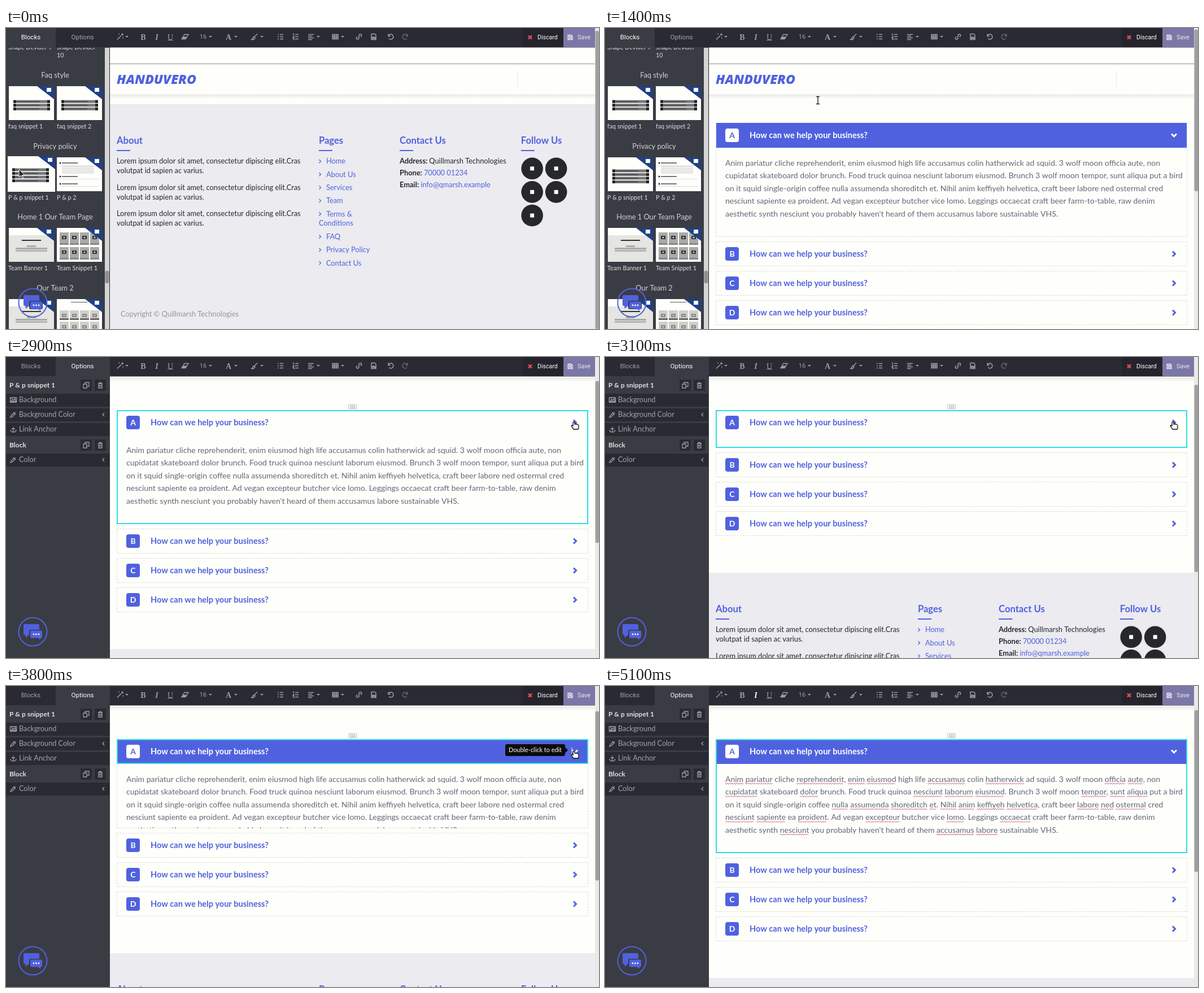
An HTML page with a canvas that plays this animation: 1050x533 px, repeating every 5.2 s.

```html
<!DOCTYPE html>
<html lang="en">
<head>
<meta charset="utf-8">
<title>Website builder: accordion snippet</title>
<style>
html, body { margin: 0; width: 100%; height: 100%; overflow: hidden; }
canvas { display: block; }
</style>
</head>
<body>
<canvas width="1050" height="533"></canvas>
<script>
const g = document.querySelector('canvas').getContext('2d');
const BLUE = '#5061df', WHITE = '#fefffb', DARK = '#2a2a33', PANEL = '#3a3c44', GREY = '#9d9da4', INK = '#26282e';
const OPEN_HEIGHT = 158;

const PARAGRAPH = [
  '~Anim ~pariatur cliche ~reprehenderit, ~enim ~eiusmod high life ~accusamus colin ~hatherwick ad squid. 3 wolf moon ~officia ~aute, non',
  '~cupidatat skateboard ~dolor brunch. Food truck quinoa ~nesciunt ~laborum ~eiusmod. Brunch 3 wolf moon ~tempor, ~sunt ~aliqua put a bird',
  'on it squid single-origin coffee ~nulla ~assumenda ~shoreditch ~et. ~Nihil ~anim ~keffiyeh ~helvetica, craft beer ~labore ~ned ~ostermal cred',
  '~nesciunt ~sapiente ea ~proident. Ad vegan ~excepteur butcher vice ~lomo. Leggings ~occaecat craft beer farm-to-table, raw denim',
  'aesthetic synth ~nesciunt you probably haven\'t heard of them ~accusamus ~labore sustainable VHS.'
];

const ICONS = {
  wand: 'M-5 5L2-2M4-6v4M2-4h4M-2-6v2M5 1v2',
  brush: 'M5-5L0 0M-1 0l2 2q-2 4-6 3q2-1 2-3z',
  list: 'M-5-4h2M-5 0h2M-5 4h2M-1-4h6M-1 0h6M-1 4h6',
  numbers: 'M-4-6v4M-5 0h2l-2 2h2M-5 4h2v2M-1-4h6M-1 0h6M-1 4h6',
  align: 'M-5-4h10M-5-1h7M-5 2h10M-5 5h7',
  table: 'M-5-4h10v8h-10zM-5-1h10M-5 1.5h10M-1.7-4v8M1.7-4v8',
  link: 'M-3 0l-1 1a2 2 0 0 0 3 3l2-2M3 0l1-1a2 2 0 0 0-3-3l-2 2M-1.5 1.5l3-3',
  file: 'M-4-5h6l2 2v8h-8zM-3 3l2-3 2 2 1-1 1 2z',
  undo: 'M-4-5v4h4M-4-1a4.5 4.5 0 1 1 1 4',
  redo: 'M4-5v4h-4M4-1a4.5 4.5 0 1 0-1 4',
  disk: 'M-4-4h6l2 2v6h-8zM-2-4v3h4v-3M-2 4v-3h4v3',
  picture: 'M-5.5-4h11v8h-11zM-4 3l3-4 2 2 2-3 2 5zM-3-2h1',
  dropper: 'M-5 5l1-3 5-5 2 2-5 5zM0-4l4 4M2-2l2-2',
  anchor: 'M0-3v8M-3-1h6M-5 1q0 4 5 4q5 0 5-4M0-5v1',
  copy: 'M-5-2h6v7h-6zM-2-2v-3h7v7h-4',
  trash: 'M-4-3h8M-1.5-3v-1.5h3v1.5M-3-3v8h6v-8M-1-1v4M1-1v4',
  chevron: 'M-2.5-4.5l4.5 4.5-4.5 4.5',
  chevronDown: 'M-4.5-2.5l4.5 4.5 4.5-4.5',
  cross: 'M-3-3l6 6M3-3l-6 6'
};

const rect = (x, y, w, h, color) => { g.fillStyle = color; g.fillRect(x, y, w, h); };
const disc = (x, y, r, color) => { g.fillStyle = color; g.beginPath(); g.arc(x, y, r, 0, 7); g.fill(); };
const round = (x, y, w, h, r, color) => { g.fillStyle = color; g.beginPath(); g.roundRect(x, y, w, h, r); g.fill(); };
const frame = (x, y, w, h, color, width = 1, dash = []) => {
  g.strokeStyle = color; g.lineWidth = width; g.setLineDash(dash);
  g.strokeRect(x, y, w, h); g.setLineDash([]);
};
// y is the visual middle of the line
function text(s, x, y, size, color, style = '', align = 'left', family = 'Lato') {
  g.font = `${style} ${size}px ${family}, sans-serif`;
  g.fillStyle = color; g.textAlign = align;
  g.fillText(s, x, y + size * .35);
  return g.measureText(s).width;
}
function path(d, x, y, fill, stroke, width = 1.3) {
  const p = new Path2D(d);
  g.save(); g.translate(x, y);
  if (fill) { g.fillStyle = fill; g.fill(p); }
  if (stroke) { g.strokeStyle = stroke; g.lineWidth = width; g.stroke(p); }
  g.restore();
}
const icon = (name, x, y, color = GREY, width) => path(ICONS[name], x, y, null, color, width);
function clipped(x, y, w, h, draw) {
  g.save(); g.beginPath(); g.rect(x, y, w, h); g.clip(); draw(); g.restore();
}

const clamp = p => Math.max(0, Math.min(1, p));
const easeOut = p => 1 - (1 - clamp(p)) ** 2.3;
const smooth = p => { p = clamp(p); return p * p * (3 - 2 * p); };
function along(points, t) {
  let [, x, y] = points[0];
  for (let i = 1; i < points.length; i++) {
    const p = smooth((t - points[i - 1][0]) / (points[i][0] - points[i - 1][0]));
    x += (points[i][1] - points[i - 1][1]) * p;
    y += (points[i][2] - points[i - 1][2]) * p;
  }
  return [x, y];
}
const POINTER = [[400, 23, 250], [900, 377, 128], [1600, 377, 128], [1800, 389, 158], [2100, 1036, 152], [2600, 1007, 121]];

function thumb(x, y, kind, w = 80, h = 60) {
  rect(x, y, w, h, WHITE);
  if (kind === 'faq' || kind === 'policy') {
    const n = kind === 'faq' ? 3 : 4;
    for (let i = 0; i < n; i++) {
      const top = y + 34.5 - n * 3.25 + i * 6.5;
      rect(x + 8, top, 65, 5, '#77787a');
      rect(x + 8, top, 5, 5, '#222');
      rect(x + 68, top, 5, 5, '#222');
      rect(x + 14, top + 2, 40, 1, '#333');
    }
  } else if (kind === 'lines') {
    [10, 34, 47].forEach(dy => {
      disc(x + 6, y + dy, 1.5, '#222');
      rect(x + 9, y + dy - 1, 28, 2, '#777');
      rect(x + 4, y + dy + 4, 70, 1, '#ddd');
    });
    for (let i = 0; i < 5; i++) rect(x + 9, y + 16 + i * 2.8, 57, 1, '#c4c4c4');
  } else if (kind === 'banner') {
    rect(x, y + 13, w, 47, '#e5e6e1');
    rect(x + 23, y + 21, 34, 2, '#333');
    rect(x + 32, y + 31, 16, 3, '#aaa');
    rect(x + 12, y + 35, 56, 3, '#aaa');
    rect(x + 12, y + 39, 56, 3, '#b4b4b4');
  } else {
    const pale = kind === 'cards';
    if (pale) rect(x + 25, y + 5, 29, 1, '#555');
    for (let i = 0; i < 8; i++) {
      const cx = x + 5 + i % 4 * 18, cy = y + (pale ? 20 : 8) + (i >> 2) * (pale ? 20 : 26);
      rect(cx, cy, 16, pale ? 17 : 22, pale ? '#cfcfcc' : '#a9aaa8');
      round(cx + 4, cy + 6, 8, 6, 1, pale ? '#888' : '#333');
      disc(cx + 8, cy + 9, 1.6, '#ccc');
      rect(cx, cy + (pale ? 14 : 19), 16, 3, pale ? '#666' : '#888');
    }
  }
  path('M-30 0H0V23z', x + w, y, '#1f4085');
  rect(x + w - 13, y + 3, 8, 7, WHITE);
}

function blocksPanel(hover) {
  clipped(0, 35, 184, 498, () => {
    const label = (s, x, y) => text(s, x, y, 10.7, '#dcdce0');
    label('Shape Devider 9', 4, 34);
    label('Shape Devider', 90, 34);
    label('10', 90, 48);
    [['Faq style', 'faq', 'faq snippet 1', 'faq', 'faq snippet 2'],
     ['Privacy policy', 'policy', 'P & p snippet 1', 'lines', 'P & p 2'],
     ['Home 1 Our Team Page', 'banner', 'Team Banner 1', 'grid', 'Team Snippet 1'],
     ['Our Team 2', 'banner', '', 'cards', '']].forEach(([title, a, aLabel, b, bLabel], i) => {
      const y = Math.round(103 + i * 125.7);
      text(title, 87, y - 19, 12.8, '#d2d2d6', '', 'center');
      if (hover && i === 1) thumb(3, y - 2, a, 84, 63);
      else thumb(5, y, a);
      thumb(90, y, b);
      label(aLabel, 4, y + 71);
      label(bLabel, 90, y + 71);
    });
    rect(175, 35, 8, 498, '#d4d4d4');
    round(175.5, 430, 7, 22, 3, '#8f8f8f');
    rect(183, 35, 1, 498, '#222');
  });
}

function optionsPanel() {
  const head = (s, y) => {
    text(s, 6, y, 12, '#e0e0e3', 'bold');
    rect(132, y - 10, 20, 20, DARK); icon('copy', 142, y);
    rect(157, y - 10, 20, 20, DARK); icon('trash', 167, y);
  };
  const row = (name, s, y, more) => {
    rect(0, y - 11, 183, 23, DARK);
    icon(name, 13, y, '#a3a3a9');
    text(s, 23, y, 12.7, '#a3a3a9');
    if (more) path('M2-3l-3 3 3 3', 172, y, null, '#a3a3a9');
  };
  head('P & p snippet 1', 50);
  row('picture', 'Background', 76);
  row('dropper', 'Background Color', 102, true);
  row('anchor', 'Link Anchor', 128);
  head('Block', 156);
  row('dropper', 'Color', 182, true);
}

function sidebar(t) {
  const options = t >= 2900;
  rect(0, 0, 184, 533, PANEL);
  rect(options ? 0 : 88, 0, options ? 88 : 96, 34, DARK);
  text('Blocks', 44, 16, 11.6, options ? GREY : '#fff', '', 'center', 'Roboto');
  text('Options', 135.5, 16, 11.6, options ? '#fff' : '#a8a8ae', '', 'center', 'Roboto');
  if (options) optionsPanel();
  else blocksPanel(t < 400);
  g.strokeStyle = BLUE; g.lineWidth = 2;
  g.beginPath(); g.arc(47.5, 486.5, 25, 0, 7); g.stroke();
  round(31, 473, 28, 19, 2, BLUE);
  path('M0 0h8l-7 6z', 34, 491, BLUE);
  round(41, 483, 24, 15, 3, PANEL);
  round(43, 484.5, 21, 13, 2, BLUE);
  path('M0 0h6v4z', 55, 496.5, BLUE);
  [49, 53.5, 58].forEach(x => disc(x, 491, 1.4, '#fff'));
}

function toolbar(W, italic) {
  rect(184, 0, W - 184, 34.5, DARK);
  const letter = (s, x, style, color = GREY) => text(s, x, 16, 14, color, style, 'center', 'Liberation Serif');
  letter('B', 243, 'bold');
  letter('I', 267, 'italic bold', italic ? '#fff' : GREY);
  letter('U', 291, '');
  rect(286, 21, 10, 1, GREY);
  letter('A', 394, 'bold');
  text('16', 349, 15.5, 11, GREY, '', 'center', 'Roboto');
  path('M-6 4L-1-4H6L1 4z', 317, 15.5, null, GREY);
  path('M-6 4L-3.5 0H3.5L1 4z', 317, 15.5, GREY);
  [['wand', 202], ['brush', 440], ['list', 486], ['numbers', 513], ['align', 540], ['table', 583],
   ['link', 625], ['file', 651], ['undo', 681]].forEach(([name, x]) => icon(name, x, 15.5, GREY, 1.5));
  icon('redo', 707, 15.5, '#66666e', 1.5);
  [214, 362, 407, 453, 553, 596].forEach(x => path('M-3-1.5h6l-3 3z', x, 15.5, GREY));
  rect(W - 128, 0, 72, 34, '#25242c');
  icon('cross', W - 115, 16.5, '#d64c5c', 2.6);
  text('Discard', W - 102, 16.5, 10.6, '#fff', '', 'left', 'Roboto');
  rect(W - 56, 0, 56, 34, '#7b77a7');
  icon('disk', W - 44, 16.5, '#e8e8f2');
  text('Save', W - 31, 16.5, 10.8, '#e8e8f2', '', 'left', 'Roboto');
}

function header(W, dy) {
  const bottom = 123 - dy;
  rect(184, Math.round(68.4 - dy), W - 184, 1, '#8b8b8b');
  text('HANDUVERO', 196, 96 - dy, 23, BLUE, 'italic 800', 'left', 'Open Sans');
  rect(W - 138, 81 - dy, 1, 30, '#e6e6e4');
  const shade = g.createLinearGradient(0, bottom, 0, bottom + 8);
  shade.addColorStop(0, '#e9eae8');
  shade.addColorStop(1, WHITE);
  rect(184, bottom, W - 184, 8, shade);
}

function footer(W, top) {
  rect(184, top, W - 184, 533, '#ebebf0');
  const column = n => 196 + (W - 184) * n / 12;
  const [about, pages, contact, follow] = [0, 5, 7, 10].map(column);
  const put = (s, x, dy, color = INK, style) => text(s, x, top + dy, 12.8, color, style);
  [['About', about], ['Pages', pages], ['Contact Us', contact], ['Follow Us', follow]].forEach(([s, x]) => {
    text(s, x, top + 64, 16.6, BLUE, 'bold');
    rect(x, top + 81, 24, 2, BLUE);
  });
  [101, 147.5, 194].forEach(dy => {
    put('Lorem ipsum dolor sit amet, consectetur dipiscing elit.Cras', about, dy);
    put('volutpat id sapien ac varius.', about, dy + 17);
  });
  ['Home', 'About Us', 'Services', 'Team', 'Terms &', 'FAQ', 'Privacy Policy', 'Contact Us'].forEach((s, i) => {
    const dy = 101 + i * 23.3 + (i > 4 ? 17 : 0);
    path('M-1.5-3l3 3-3 3', pages + 2, top + dy, null, BLUE);
    put(s, pages + 13, dy, BLUE);
  });
  put('Conditions', pages, 211, BLUE);
  [['Address:', 'Quillmarsh Technologies', INK], ['Phone:', '70000 01234', BLUE], ['Email:', 'info@qmarsh.example', BLUE]]
    .forEach(([label, value, color], i) => {
      const w = put(label, contact, 101 + i * 21, INK, 'bold');
      put(value, contact + w + 3, 101 + i * 21, color);
    });
  for (let i = 0; i < 5; i++) {
    const x = follow + 19.8 + i % 2 * 42.5, y = top + 113.8 + (i >> 1) * 41.6;
    disc(x, y, 19.3, '#26282a');
    rect(x - 3.5, y - 3.5, 7, 7, '#fff');
  }
  put('Copyright © Quillmarsh Technologies', 203, 371.5, '#96979c');
}

function squiggle(x, y, w) {
  g.strokeStyle = '#d0507a'; g.lineWidth = 1;
  g.beginPath(); g.moveTo(x, y);
  for (let i = 2; i <= w; i += 2) g.lineTo(x + i, y + i / 2 % 2 * 2);
  g.stroke();
}

function paragraph(top, checkedLines) {
  PARAGRAPH.forEach((line, i) => {
    const y = top + i * 22.5;
    text(line.replaceAll('~', ''), 213, y, 14, '#626776');
    if (i >= checkedLines) return;
    let x = 213;
    for (const word of line.split(' ')) {
      const plain = word.replace('~', '');
      if (plain !== word) squiggle(x, y + 7, g.measureText(plain.replace(/[.,]$/, '')).width);
      x += g.measureText(plain + ' ').width;
    }
  });
}

function accordion(top, extra, active, checkedLines) {
  [...'ABCD'].forEach((letter, i) => {
    const y = top + i * 52 + (i ? extra : 0), on = active && !i;
    frame(196.5, y + .5, 834, 43 + (i ? 0 : extra), '#d8dad8', 1, [3, 2]);
    if (on) rect(197, y, 833, 44, BLUE);
    round(213, y + 10, 24, 24, 4, on ? WHITE : BLUE);
    text(letter, 225, y + 22, 14, on ? BLUE : WHITE, 'bold', 'center');
    text('How can we help your business?', 256, y + 22, 14.5, on ? WHITE : BLUE, 'bold');
    icon(on ? 'chevronDown' : 'chevron', 1007.5, y + 22, on ? WHITE : BLUE, 3);
  });
  clipped(197, top + 44, 833, extra, () => paragraph(top + 71, checkedLines));
}

function pointer(t) {
  const [x, y] = along(POINTER, t);
  if (t < 500 || (t >= 2100 && t < 2400)) {
    path('M0 0V14L3.5 11 6 16.5 8 15.5 5.5 10.5H10z', x, y, '#222', '#fff', 1);
  } else if (t < 1300) {
    path('M-5-1q-1-3 2-3q2-2 4-1q3-1 4 1q2 0 1 4l-1 4h-8z', x, y, '#fff', '#111', 1.4);
  } else if (t < 2100) {
    path('M-3-6.5h2.5l.5 1 .5-1H3M0-6v12M-3 6.5h2.5l.5-1 .5 1H3', x, y, null, '#222', 1.4);
  } else if (t < 4200) {
    path('M-3 1v-6q1.5-2 3 0v3q5-1 7 2v4l-1 3h-8l-4-6q1-2 3 0z', x, y, '#fff', '#111', 1.3);
  }
}

function tooltip() {
  round(884, 103, 106, 21, 3, '#0c0c0e');
  path('M0-5l5 5-5 5z', 990, 113.5, '#0c0c0e');
  text('Double-click to edit', 937, 113, 10.9, '#fff', '', 'center');
}

function draw(t) {
  const dragging = t >= 500 && t < 1300, placed = t >= 1300, selected = t >= 2900;
  const W = dragging ? 1050 : 1043;
  const scroll = dragging ? 0 : 5 + 73 * smooth((t - 1500) / 300) + selected;
  const openness = t < 3650 ? 1 - easeOut((t - 2900) / 350) : easeOut((t - 3650) / 350);
  const extra = Math.round(OPEN_HEIGHT * openness), top = Math.round(173 - scroll);

  rect(0, 0, 1050, 533, WHITE);
  clipped(184, 34, W - 184, 499, () => {
    header(W, scroll * 1.1);
    footer(W, placed ? top + 265 + extra : 135);
    if (placed) accordion(top, extra, !selected || t >= 3700, Math.floor((t - 4200) / 100));
    if (dragging) {
      rect(184, 111, W - 184, 24, 'rgba(85,85,125,.17)');
      rect(184, 123, W - 184, 5, 'rgba(60,60,80,.04)');
      frame(184.5, 111.5, W - 185, 23, '#b3b3ba', 1, [5, 3]);
    }
    if (selected) {
      frame(197, top + 1, 833, (t >= 3700 && t < 4200 ? 44 : 44 + extra) - 2, '#2fdde6', 2);
      round(606, 83.5, 15, 9, 2, '#c3c4c6');
      round(607, 84.5, 13, 7, 1, '#f4f5f3');
      for (let i = 0; i < 6; i++) rect(610 + i % 3 * 3, 86 + (i > 2 ? 3 : 0), 1.5, 1.5, '#888');
    }
  });
  sidebar(t);
  toolbar(W, t >= 4300);
  if (!dragging) {
    const total = placed ? 833 + extra : 538;
    rect(1043, 0, 7, 533, '#e9e9e7');
    round(1043.5, scroll * 533 / total, 6.5, 533 * 533 / total, 3, '#a0a0a0');
  }
  if (dragging) {
    const [x, y] = along(POINTER, t);
    rect(x - 4, y - 2, 80, 84, PANEL);
    thumb(x - 4, y - 2, 'policy', 80, 62);
    rect(x - 4, y - 2, 1, 22, '#444');
    text('P & p snippet 1', x, y + 71, 10.7, '#dcdce0');
  }
  if ((t >= 3700 && t < 4300) || (t >= 4500 && t < 5100)) rect(1001.5, 109, 1, 13, '#fff');
  if (t >= 3500 && t < 4200) tooltip();
  pointer(t);
}

function tick(now) {
  draw(Math.floor(now % 5200 / 100) * 100);
  requestAnimationFrame(tick);
}
requestAnimationFrame(tick);
</script>
</body>
</html>
```
